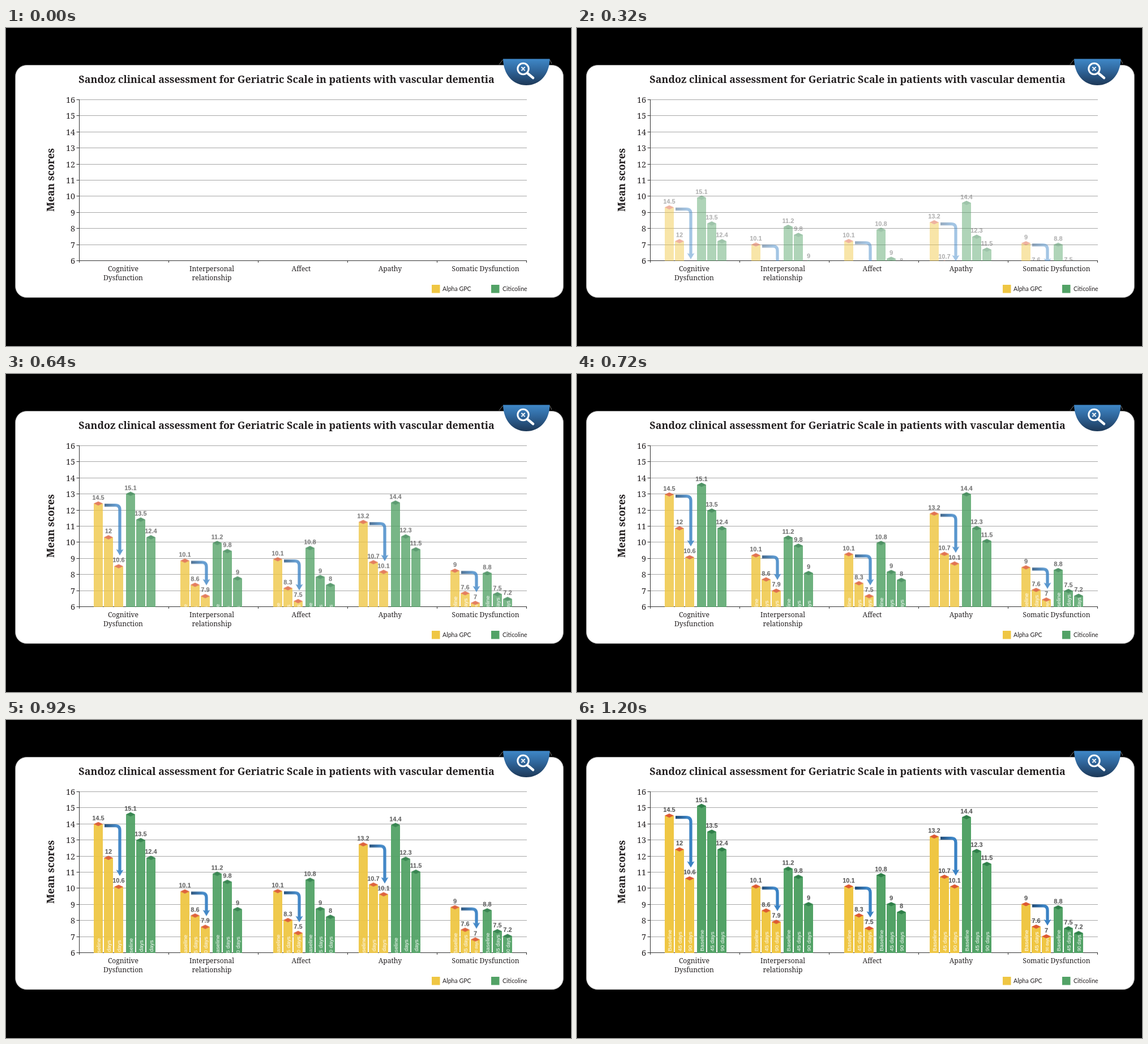
An HTML page that plays this animation: 998 px wide and 561 px high, repeating every 8 s.

```html
<!DOCTYPE html>
<html lang="en">
<head>
<meta charset="utf-8">
<title>Mean scores chart</title>
<style>
  html, body { margin: 0; width: 100%; height: 100%; overflow: hidden; background: #000; }
  svg { display: block; width: 100vw; height: 100vh; }
  text { text-anchor: middle; fill: #231f20; }
  .bold { font: bold 17.87px "Noto Serif", serif; }
  .scale { font: 14.4px "Noto Serif", serif; text-anchor: end; }
  .cat { font: 12.1px "Noto Serif", serif; }
  .key { font: 10.6px Lato, sans-serif; text-anchor: start; }
  .val { font: bold 11.1px "Liberation Sans", Arial, sans-serif; fill: #4d4d4d; }
  .day { font-family: "Liberation Sans", Arial, sans-serif; fill: #fff; text-anchor: start; }
  .rise { animation: rise 8s infinite; }
  /* the bezier is an exact quadratic ease-out */
  @keyframes rise {
    0% { transform: translateY(var(--h)); opacity: 0; animation-timing-function: cubic-bezier(.3333, .6667, .6667, 1); }
    15%, 100% { transform: translateY(0); opacity: 1; }
  }
</style>
</head>
<body>
<svg viewBox="0 0 998 561" xmlns="http://www.w3.org/2000/svg">
  <defs>
    <linearGradient id="tab" x2="0" y2="1">
      <stop offset="0" stop-color="#3f88c8"/>
      <stop offset=".45" stop-color="#2f659a"/>
      <stop offset="1" stop-color="#1d3857"/>
    </linearGradient>
    <linearGradient id="blue">
      <stop offset="0" stop-color="#1f4a75"/>
      <stop offset=".75" stop-color="#3a82c4"/>
    </linearGradient>
    <clipPath id="floor"><rect y="100" width="998" height="310.5"/></clipPath>
  </defs>
  <rect x="16.5" y="65.5" width="968" height="410" rx="20" fill="#fff" stroke="#8c8c8c"/>
  <path d="M871 64.5L877.5 56M960.5 56L964 63" stroke="#777" fill="none"/>
  <path d="M878 54.5H960.5C960 82 943 101 919 101S878.5 82 878 54.5Z" fill="url(#tab)"/>
  <g stroke="#fff" fill="none" stroke-linecap="round">
    <circle cx="913.5" cy="72" r="9.7" stroke-width="3"/>
    <path d="M922 80.5L931 88" stroke-width="4.5"/>
    <path d="M911 69.5L916 74.5M916 69.5L911 74.5" stroke-width="2"/>
  </g>
  <text class="bold" x="495.5" y="97">Sandoz clinical assessment for Geriatric Scale in patients with vascular dementia</text>
  <text class="bold" transform="translate(85 268) rotate(-90)">Mean scores</text>
  <g id="axes"></g>
  <g id="bars" clip-path="url(#floor)"></g>
  <rect x="752" y="453" width="14.5" height="14.5" fill="#efc643"/>
  <text class="key" x="771" y="463.7">Alpha GPC</text>
  <rect x="857" y="453" width="14.5" height="14.5" fill="#52a266"/>
  <text class="key" x="877" y="463.7">Citicoline</text>
</svg>
<script>
  const YELLOW = ['#efc643', '#dd5a32'], GREEN = ['#52a266', '#2f7f49'];
  const DAYS = ['Baseline', '45 days', '90 days'];
  const BASE = 410, UNIT = 28.4;

  // x: first bar centre; mid: caption centre; each set rises as one block.
  // A pair is [label, drawn score] where the bar does not follow its label.
  const groups = [
    { x: 163, mid: 207, name: 'Cognitive|Dysfunction', sets: [[14.5, [12, 12.4], 10.6, 15.1, 13.5, 12.4]] },
    { x: 316, mid: 363.5, name: 'Interpersonal|relationship', sets: [[10.1, 8.6, 7.9, 11.2, [9.8, 10.7], 9]] },
    { x: 480, mid: 521.5, name: 'Affect', sets: [[10.1, 8.3, 7.5, 10.8, 9, [8, 8.5]]] },
    { x: 631, mid: 678.5, name: 'Apathy', sets: [[13.2, 10.7, 10.1, 14.4, 12.3, 11.5]] },
    { x: 793, mid: 847, name: 'Somatic Dysfunction', sets: [[9, 7.6, 7], [8.8, 7.5, 7.2]] }
  ];

  const scoreY = score => BASE - (score - 6) * UNIT;
  const topOf = bar => scoreY([bar].flat().at(-1));
  const line = (d, color) => `<path d="${d}" stroke="${color}" fill="none"/>`;

  function axes() {
    let out = '';
    for (let score = 16; score >= 6; score--) {
      const y = Math.round(scoreY(score)) + .5;
      if (score > 6) out += line(`M129 ${y}H920`, '#a8a8a8');
      out += line(`M124.5 ${y}H129`, '#333');
      out += `<text class="scale" x="122" y="${y + 5.5}">${score}</text>`;
    }
    out += line(`M129.5 126V414M129 ${BASE + .5}H920`, '#333');
    for (let i = 1; i <= 5; i++) out += line(`M${129.5 + i * 158} ${BASE}v4`, '#333');
    for (const g of groups)
      g.name.split('|').forEach((s, i) => out += `<text class="cat" x="${g.mid}" y="${428.5 + i * 16}">${s}</text>`);
    return out;
  }

  function bar(x, data, i) {
    const [fill, cap] = i < 3 ? YELLOW : GREEN;
    const top = topOf(data), tall = BASE - top;
    const size = Math.min(9.9, (tall - 4) / 3.6);
    return `<rect x="${x - 8}" y="${top}" width="16" height="${tall + 2}" fill="${fill}"/>
      <path d="M${x - 8} ${top}l8 -3.7 8 3.7 -8 3.7z" fill="${cap}"/>
      <text class="val" x="${x}" y="${top - 7}">${[data].flat()[0]}</text>
      <text class="day" font-size="${size}" transform="translate(${x + 3.5} 408) rotate(-90)">${DAYS[i % 3]}</text>`;
  }

  // Leads from the first bar's top to just above the third bar.
  function arrow(x, first, third) {
    const end = x + 38, y = topOf(first) + 3, tip = topOf(third) - 19;
    return `<path d="M${x + 11} ${y}H${end - 8}Q${end} ${y} ${end} ${y + 8}V${tip - 9}" fill="none" stroke="url(#blue)" stroke-width="5.3"/>
      <path d="M${end - 6.5} ${tip - 11}Q${end} ${tip - 8} ${end + 6.5} ${tip - 11}L${end} ${tip}Z" fill="#3a82c4"/>`;
  }

  function group({ x, sets }) {
    let n = 0;
    return sets.map((set, k) => {
      const travel = 427 - Math.min(...set.map(topOf));
      const bars = set.map(b => {
        const i = n++;
        return bar(x + i * 18 + (i > 2 ? 3 : 0), b, i);
      }).join('');
      const lead = k ? '' : arrow(x, set[0], set[2]);
      return `<g class="rise" style="--h:${travel}px">${bars}${lead}</g>`;
    }).join('');
  }

  document.getElementById('axes').innerHTML = axes();
  document.getElementById('bars').innerHTML = groups.map(group).join('');
</script>
</body>
</html>
```
